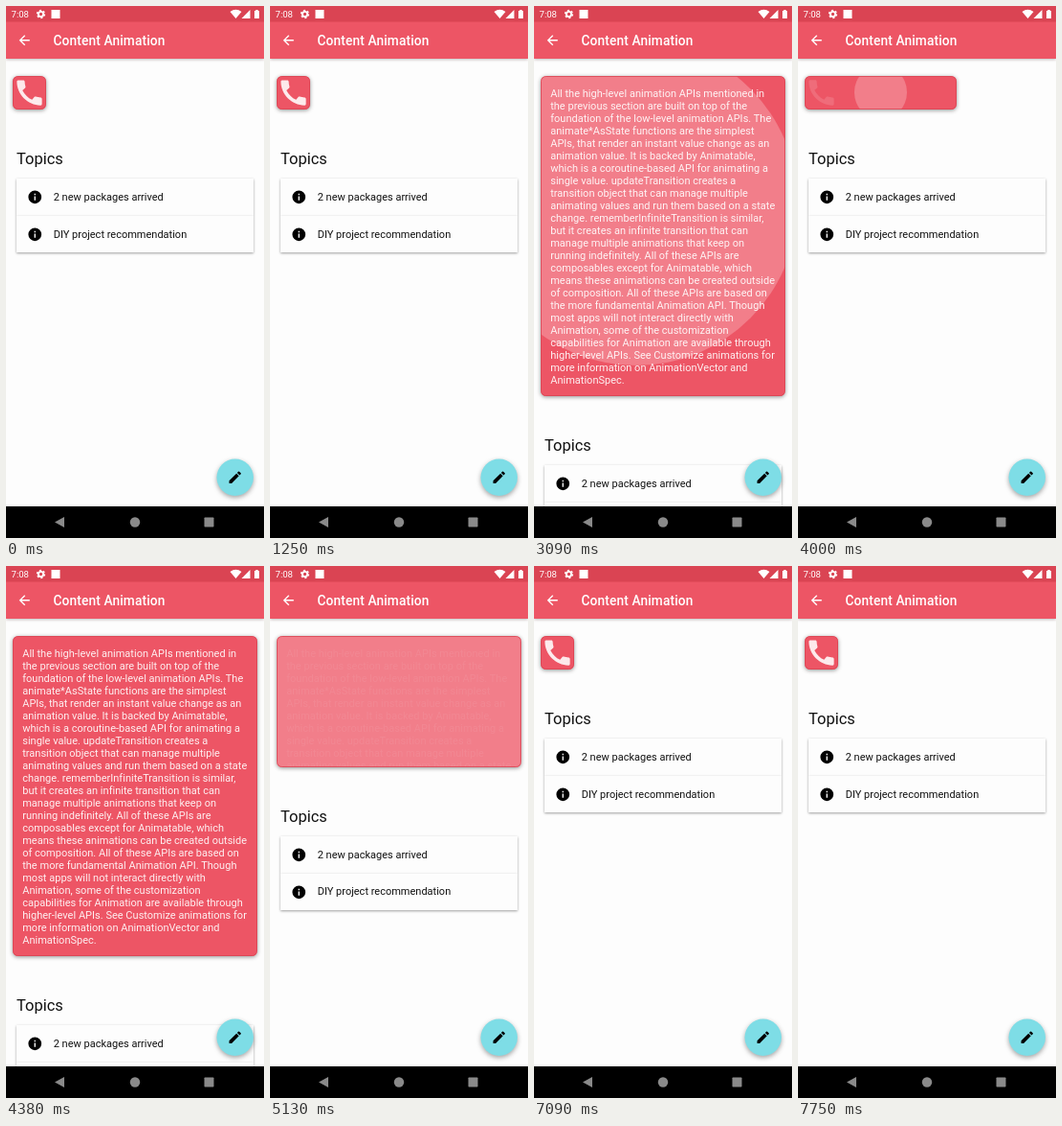
These frames come from a looping animation (270 px wide and 555 px high, 8 s). An HTML page:

```html
<!DOCTYPE html>
<html lang="en">
<head>
<meta charset="utf-8">
<title>Content Animation</title>
<style>
  html, body { margin: 0; width: 100%; height: 100%; overflow: hidden; background: #fdfdfd; }
  body { position: relative; font: 11px/13px Roboto, sans-serif; color: #111; }
  #card, #below, .row, #text, .ripple, .row span, .row svg, #phone, #chrome { position: absolute; }
  #card { left: 6.9px; top: 72.9px; border-radius: 5.5px; background: #ed5565; overflow: hidden;
    box-shadow: 0 1px 4px rgba(0,0,0,.42); }
  #card::after { content: ""; position: absolute; inset: 0; border: 1px solid #da4453cc; border-radius: 5.5px; }
  #phone { left: 0; top: 0; fill: #ffffffe0; }
  #text { left: 10.3px; top: 12px; color: #ffffffe8; white-space: pre; letter-spacing: .015px; }
  .ripple { border-radius: 50%; }
  #card .ripple { background: #ffffff3d; }
  .row .ripple { background: #0000001f; }
  #below { left: 11px; width: 248px; }
  h1 { position: absolute; margin: 0; top: 42.3px; font: 16.5px/20px Roboto, sans-serif; }
  .row { left: 0; width: 248px; height: 38.5px; background: #fdfdfd; box-shadow: 0 1px 2.5px rgba(0,0,0,.38); }
  .clip { position: absolute; inset: 0; overflow: hidden; }
  .row svg { left: 11px; top: 11px; }
  .row span { left: 38.7px; top: 12.7px; white-space: nowrap; }
  #chrome { left: 0; top: 0; }
  .lift { filter: drop-shadow(0 1px 1.5px rgba(0,0,0,.25)); }
</style>
</head>
<body>
<div id="card">
  <div id="text">All the high-level animation APIs mentioned in
the previous section are built on top of the
foundation of the low-level animation APIs. The
animate*AsState functions are the simplest
APIs, that render an instant value change as an
animation value. It is backed by Animatable,
which is a coroutine-based API for animating a
single value. updateTransition creates a
transition object that can manage multiple
animating values and run them based on a state
change. rememberInfiniteTransition is similar,
but it creates an infinite transition that can
manage multiple animations that keep on
running indefinitely. All of these APIs are
composables except for Animatable, which
means these animations can be created outside
of composition. All of these APIs are based on
the more fundamental Animation API. Though
most apps will not interact directly with
Animation, some of the customization
capabilities for Animation are available through
higher-level APIs. See Customize animations for
more information on AnimationVector and
AnimationSpec.</div>
  <svg id="phone" width="35" height="35" viewBox="0 0 24 24"><path d="M20.01 15.38c-1.23 0-2.42-.2-3.53-.56-.35-.12-.74-.03-1.01.24l-1.57 1.97c-2.83-1.35-5.48-3.9-6.89-6.83l1.95-1.66c.27-.28.35-.67.24-1.02-.37-1.11-.56-2.3-.56-3.53 0-.54-.45-.99-.99-.99H4.19C3.65 3 3 3.24 3 3.99 3 13.28 10.73 21 20.01 21c.71 0 .99-.63.99-1.18v-3.45c0-.54-.45-.99-.99-.99z"/></svg>
  <div class="ripple" id="cardRipple"></div>
</div>

<div id="below">
  <h1>Topics</h1>
  <div class="row" style="top:72.5px">
    <div class="clip"><div class="ripple" id="rowRipple"></div></div>
    <svg width="16.5" height="16.5" viewBox="0 0 24 24"><path id="info" d="M12 2a10 10 0 100 20 10 10 0 000-20zm1 15h-2v-6h2zm0-8h-2V7h2z"/></svg>
    <span>2 new packages arrived</span>
  </div>
  <div class="row" style="top:111px">
    <svg width="16.5" height="16.5" viewBox="0 0 24 24"><use href="#info"/></svg>
    <span>DIY project recommendation</span>
  </div>
</div>

<svg id="chrome" width="270" height="555" fill="#fff">
  <rect class="lift" width="270" height="55" fill="#ed5565"/>
  <rect width="270" height="16.5" fill="#da4453"/>
  <text x="5.5" y="12" font-size="9.6">7:08</text>
  <g fill="none" stroke="#fff">
    <circle cx="36.5" cy="8.5" r="2.6" stroke-width="1.9"/>
    <circle cx="36.5" cy="8.5" r="4" stroke-width="1.3" stroke-dasharray="2.1 2.09"/>
  </g>
  <rect x="47.5" y="4" width="9" height="9"/>
  <path d="M234.5 6q6-4.5 12 0l-6 7zM255.5 4v9h-9zM260 5h1.3v-1h2.4v1h1.3v8h-5z"/>
  <path transform="translate(11 27.5) scale(.6875)" d="M20 11H7.83l5.59-5.59L12 4l-8 8 8 8 1.41-1.41L7.83 13H20z"/>
  <text x="49.5" y="41" font-size="13.75" font-weight="500" letter-spacing=".12">Content Animation</text>
  <circle cx="239.75" cy="491.75" r="19.25" fill="#7edde6" style="filter:drop-shadow(0 2px 2.5px rgba(0,0,0,.35))"/>
  <path fill="#000" transform="translate(231.5 483.5) scale(.6875)" d="M3 17.25V21h3.75L17.81 9.94l-3.75-3.75zM20.71 7.04a1 1 0 000-1.41l-2.34-2.34a1 1 0 00-1.41 0l-1.83 1.83 3.75 3.75z"/>
  <rect y="522" width="270" height="33" fill="#000"/>
  <g fill="#8a8a8a">
    <path d="M51 538.5l10-5.5v11z"/>
    <circle cx="135" cy="538.5" r="5.2"/>
    <rect x="207.5" y="533.5" width="10" height="10" rx=".8"/>
  </g>
</svg>

<script>
const $ = id => document.getElementById(id);
const LOOP = 8000, SMALL = 35, WIDE = 256.2, TALL = 334;

// press: finger down; go: resize starts; x, y: touch point inside the card
const taps = [
  { press: -2000, go: -2000, dur: 300, open: false, x: 17, y: 17 },
  { press: 1834, go: 1875, dur: 300, open: true, x: 18, y: 17 },
  { press: 3004, go: 3092, dur: 198, open: false, x: 61, y: 85 },
  { press: 3880, go: 3917, dur: 300, open: true, x: 18, y: 17 },
  { press: 4960, go: 5032, dur: 300, open: false, x: 61, y: 85 }
];
const rowTap = { press: 6150, x: 109, y: 19 };

const clamp = v => Math.min(1, Math.max(0, v));
const mix = (a, b, k) => a + (b - a) * k;

// cubic-bezier(.4, 0, .2, 1)
function ease(x) {
  let lo = 0, hi = 1;
  for (let i = 0; i < 20; i++) {
    const s = (lo + hi) / 2, r = 1 - s;
    if (1.2 * s * r * r + 0.6 * s * s * r + s ** 3 < x) lo = s; else hi = s;
  }
  return lo * lo * (3 - 2 * lo);
}

// w0, h0: size when pressed; w, h: size now
function ripple(el, tap, t, w0, h0, w, h) {
  const age = t - tap.press, k = ease(clamp(age / 225));
  const r = mix(Math.max(w0, h0) * 0.3, Math.hypot(w0, h0) / 2 + 6.9, k);
  const cx = w / 2 + (tap.x - w0 / 2) * (1 - k);
  const cy = h / 2 + (tap.y - h0 / 2) * (1 - k);
  el.style.cssText = `left:${cx - r}px;top:${cy - r}px;width:${2 * r}px;height:${2 * r}px;` +
    `opacity:${clamp(Math.min(age / 75, 1 - (age - 225) / 150))}`;
}

function draw() {
  const t = performance.now() % LOOP;
  const tap = taps.findLast(a => a.press <= t);
  const p = clamp((t - tap.go) / tap.dur), k = tap.open ? p : 1 - p;
  // width opens first, height closes first
  const w = mix(SMALL, WIDE, clamp(2 * k)), h = mix(SMALL, TALL, clamp(2 * k - 1));
  const fadeOut = 1 - ease(clamp(2 * p)), fadeIn = ease(clamp(2 * p - 1));

  $("card").style.width = w + "px";
  $("card").style.height = h + "px";
  $("text").style.opacity = tap.open ? fadeIn : fadeOut;
  $("phone").style.opacity = tap.open ? fadeOut : fadeIn;
  $("below").style.top = 72.9 + h + "px";
  ripple($("cardRipple"), tap, t, tap.open ? SMALL : WIDE, tap.open ? SMALL : TALL, w, h);
  ripple($("rowRipple"), rowTap, t, 248, 38.5, 248, 38.5);
  requestAnimationFrame(draw);
}
draw();
</script>
</body>
</html>
```
